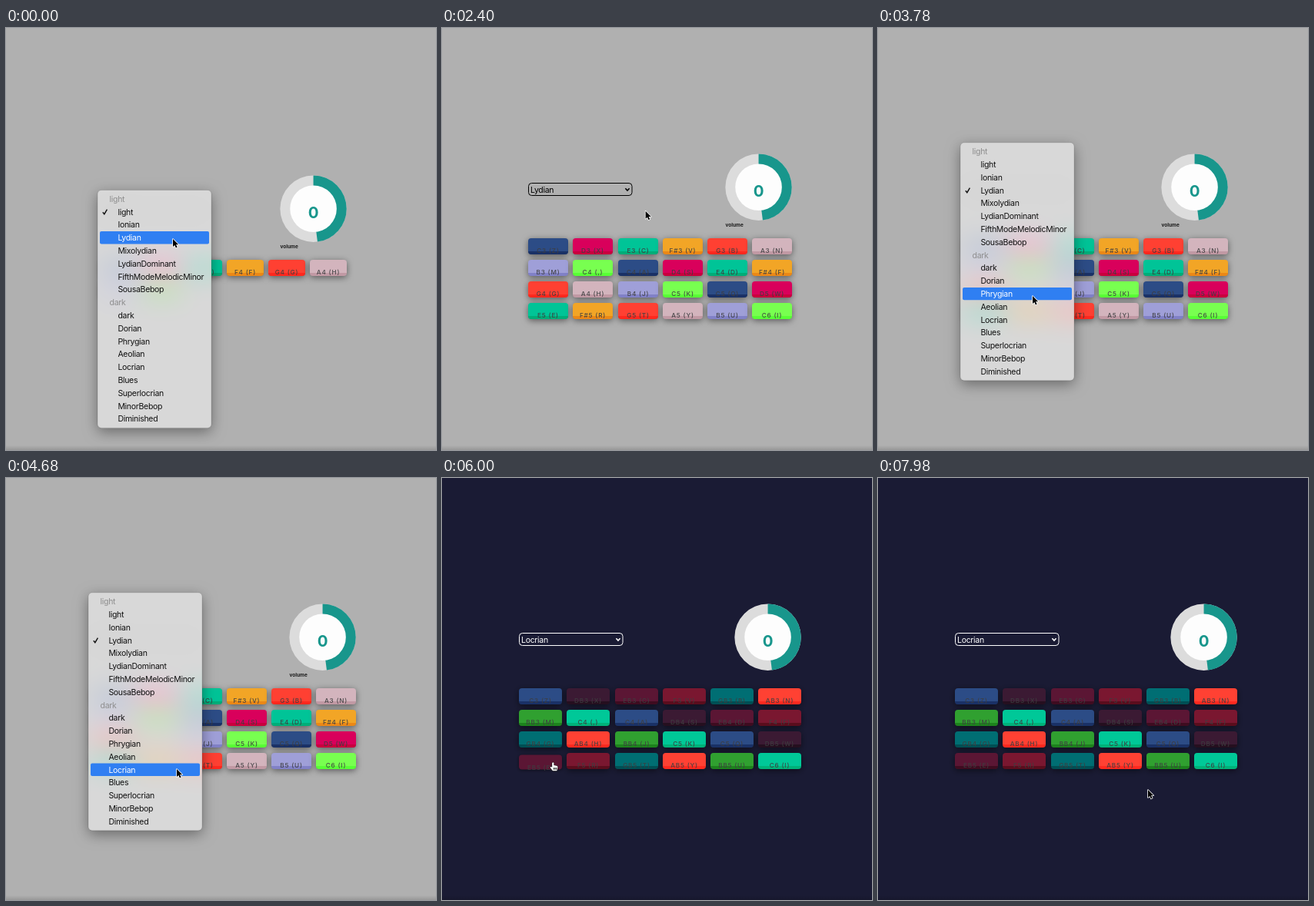
Write an HTML page with a canvas that moves like this. It is 559 px wide and 548 px high and loops after 8 s.

```html
<!DOCTYPE html>
<html lang="en">
<head>
<meta charset="utf-8">
<title>Scale keyboard</title>
<style>
html, body { margin: 0; width: 100%; height: 100%; overflow: hidden; background: #b0b0b0; }
canvas { display: block; }
</style>
</head>
<body>
<canvas id="stage" width="559" height="548"></canvas>
<script>
const W = 559, H = 548, LOOP = 8000, STEP = 60;
const canvas = document.getElementById('stage');
const ctx = canvas.getContext('2d');
const FONT = 'Inter, "Liberation Sans", sans-serif';

const SCALES = {
  light: 'light Ionian Lydian Mixolydian LydianDominant FifthModeMelodicMinor SousaBebop'.split(' '),
  dark: 'dark Dorian Phrygian Aeolian Locrian Blues Superlocrian MinorBebop Diminished'.split(' ')
};
const ITEMS = Object.entries(SCALES).flatMap(([group, names]) =>
  [{ name: group, header: true }, ...names.map(name => ({ name }))]);
const ROW = 16.8, MENU_W = 148, MENU_H = 309;

const LETTERS = 'ZXCVBNM,ASDFGHJKQWERTYUI';
const BRIGHT = ['#2c4c86', '#d9005b', '#00c497', '#f2a526', '#ff4032', '#d3b4bd', '#9f9fd8', '#78ff50'];
const DEEP = ['#2c4c86', '#3b1a33', '#5b1634', '#7a1730', '#006e73', '#ff4133', '#30a030', '#00c898'];

const KEY_H = 21, GAP = 6.1, COLS = 6, CENTER = 283.6;
const LIGHT = layout(48, 301, 'C D E F G A B C', LETTERS.slice(8, 16));
const LYDIAN = layout(52, 273, 'C D E F# G A B C', LETTERS);
const LOCRIAN = layout(56, 273, 'C DB EB F GB AB BB C', LETTERS, true);

// Pointer stops: an eased move to x, y that bows out by bowX, bowY on the way
const STOPS = [
  { t: 0, x: 217, y: 274 },
  { t: 1200, x: 188, y: 314 },
  { t: 2640, x: 222, y: 211, bowX: 215, bowY: 95 },
  { t: 3180, x: 223, y: 316 },
  { t: 3780, x: 201, y: 348, bowY: 100 },
  { t: 4500, x: 222, y: 378, bowY: -170 },
  { t: 4800, x: 222, y: 378 },
  { t: 5100, x: 263, y: 302 },
  { t: 5940, x: 140, y: 365, bowX: 230, bowY: 20 },
  { t: 7020, x: 179, y: 367, bowX: 170, bowY: 172 },
  { t: LOOP - 20, x: 351, y: 405, bowX: 60, bowY: -30 }
];

const ARROW = new Path2D('M0 0V10L2.3 7.9L3.9 11.4L5.6 10.6L4 7.2H7.2Z');
const HAND = new Path2D('M-1.2 6.5V1Q0 -.8 1.1 1V4L5 4.6Q6.2 4.8 6.1 6.5L5 11.2H-.4L-3.8 7Q-3.6 4.8 -1.2 6.5Z');
const KNUCKLES = new Path2D('M1 7v2.6M2.6 7v2.6M4.2 7v2.6');

const clamp = v => Math.max(0, Math.min(1, v));
const lerp = (a, b, k) => a + (b - a) * k;

// The keyboard is centred; the select and dial line up with its edges
function layout(keyW, top, notes, letters, dark = false) {
  const width = COLS * keyW + (COLS - 1) * GAP, left = CENTER - width / 2;
  const names = notes.split(' ');
  const keys = [...letters].map((letter, n) => {
    const i = LETTERS.indexOf(letter), deg = i % 8;
    const octave = 3 + Math.floor(i / 8) + (deg === 7 ? 1 : 0);
    return { deg, label: `${names[deg]}${octave} (${letter})`, w: keyW,
      x: Math.round(left + (n % COLS) * (keyW + GAP)), y: top + Math.floor(n / COLS) * 28 };
  });
  return { keys, dark, x: Math.floor(left), selY: top - 63.5,
    dialX: left + width - 43.3, dialY: top - 66.3 };
}

function pointerAt(t) {
  const i = Math.max(1, STOPS.findIndex(s => s.t >= t));
  const a = STOPS[i - 1], b = STOPS[i];
  const k = (1 - Math.cos(Math.PI * (t - a.t) / (b.t - a.t))) / 2;
  const bow = Math.sin(Math.PI * k);
  return { x: lerp(a.x, b.x, k) + (b.bowX || 0) * bow, y: lerp(a.y, b.y, k) + (b.bowY || 0) * bow };
}

function mix(from, to, k) {
  const channel = (hex, i) => parseInt(hex.slice(i, i + 2), 16);
  return `rgb(${[1, 3, 5].map(i => Math.round(lerp(channel(from, i), channel(to, i), k)))})`;
}

function roundRect(x, y, w, h, r) {
  ctx.beginPath();
  ctx.roundRect(x, y, w, h, r);
}

function stroke(color, width) {
  ctx.strokeStyle = color;
  ctx.lineWidth = width;
  ctx.stroke();
}

function shadow(color, blur, dy) {
  ctx.shadowColor = color;
  ctx.shadowBlur = blur;
  ctx.shadowOffsetY = dy;
}

function text(str, x, y, size, color, { weight = 400, spacing = 0, align = 'left' } = {}) {
  ctx.font = `${weight} ${size}px ${FONT}`;
  ctx.letterSpacing = spacing + 'px';
  ctx.textAlign = align;
  ctx.fillStyle = color;
  ctx.fillText(str, x, y);
}

function uiText(str, x, y, color) {
  text(str, x, y, 10.5, color, { spacing: -0.3 });
}

function drawBackground(dark) {
  ctx.fillStyle = dark ? '#1a1b34' : '#b0b0b0';
  ctx.fillRect(0, 0, W, H);
  const edge = ctx.createLinearGradient(0, H - 6, 0, H);
  edge.addColorStop(0, 'rgba(0,0,0,0)');
  edge.addColorStop(1, 'rgba(0,0,0,.14)');
  ctx.fillStyle = edge;
  ctx.fillRect(0, H - 6, W, 6);
}

function drawKey({ x, y, w, label }, color, hover) {
  const top = y + (hover ? 2.5 : 0), h = KEY_H - (hover ? 2 : 0);
  ctx.save();
  shadow('rgba(0,0,0,.5)', hover ? 4 : 9, hover ? 1 : 2);
  ctx.fillStyle = color;
  roundRect(x, top, w, h, 4);
  ctx.fill();
  ctx.restore();
  if (!hover) {
    ctx.save();
    ctx.clip();
    ctx.globalCompositeOperation = 'multiply';
    ctx.globalAlpha = 0.5;
    ctx.fillStyle = color;
    ctx.fillRect(x, top + h - 4, w, 4);
    ctx.restore();
  }
  text(label, x + w / 2, top + 19, 8.2, 'rgba(62,62,64,.92)',
    { weight: 500, spacing: 0.8, align: 'center' });
}

function drawDial({ dialX: x, dialY: y, dark }) {
  const pie = (r, color, share) => {
    ctx.beginPath();
    ctx.moveTo(x, y);
    ctx.arc(x, y, r, -Math.PI / 2, Math.PI * (2 * share - 0.5));
    ctx.fillStyle = color;
    ctx.fill();
  };
  pie(43.2, '#dcdcdc', 1);
  pie(43.2, '#18968c', 0.48);
  pie(30.3, '#fdfdfd', 1);
  text('0', x, y + 11.8, 20.5, '#18968c', { weight: 700, align: 'center' });
  if (!dark) text('volume', x - 43, y + 50.8, 6.5, '#1c1c1c', { weight: 700 });
}

function drawSelect({ x, selY, dark }, label, focus) {
  const ink = dark ? '#ffffff' : '#000000';
  roundRect(x + 0.5, selY - 8, 134.5, 16, 4);
  stroke(focus ? '#5bb4cc' : ink, 1);
  uiText(label, x + 3, selY + 4.3, ink);
  ctx.beginPath();
  ctx.moveTo(x + 126.4, selY - 1.2);
  ctx.lineTo(x + 129, selY + 1.5);
  ctx.lineTo(x + 131.6, selY - 1.2);
  stroke(ink, 1.6);
}

function drawMenuItem({ name, header }, x, cy, active, checked) {
  const on = active && !header;
  if (on) {
    ctx.fillStyle = '#2f7ff2';
    roundRect(x + 3, cy - 8, MENU_W - 6, 16.4, 2);
    ctx.fill();
  }
  const ink = header ? '#8e8e8e' : on ? '#ffffff' : '#111111';
  uiText(name, x + (header ? 15.5 : 26.4), cy + 4, ink);
  if (checked) {
    ctx.beginPath();
    ctx.moveTo(x + 6.8, cy + 0.8);
    ctx.lineTo(x + 8.8, cy + 3.2);
    ctx.lineTo(x + 12.4, cy - 2.8);
    stroke(ink, 1.4);
  }
}

function drawMenu(lay, choice, pointer, alpha) {
  const checked = ITEMS.findIndex(item => item.name === choice && !item.header);
  const x = lay.x - 5, y = lay.selY - 10.3 - ROW * checked;
  const active = Math.floor((pointer.y - y - 2.9) / ROW);
  const sheet = () => roundRect(x, y, MENU_W, MENU_H, 5);
  ctx.save();
  ctx.globalAlpha = alpha;

  // Blurred backdrop
  ctx.save();
  sheet();
  ctx.clip();
  ctx.filter = 'blur(16px) saturate(1.9)';
  ctx.drawImage(canvas, 0, 0);
  ctx.restore();

  // Shadow outside the sheet only
  ctx.save();
  sheet();
  ctx.rect(0, 0, W, H);
  ctx.clip('evenodd');
  shadow('rgba(0,0,0,.4)', 18, 5);
  ctx.fillStyle = '#999';
  sheet();
  ctx.fill();
  ctx.restore();

  sheet();
  ctx.fillStyle = 'rgba(224,224,224,.84)';
  ctx.fill();
  stroke('rgba(0,0,0,.2)', 0.7);
  ITEMS.forEach((item, i) =>
    drawMenuItem(item, x, y + 11.3 + i * ROW, i === active, i === checked));
  ctx.restore();
}

function drawPointer({ x, y }, hand) {
  ctx.save();
  ctx.translate(x, y);
  ctx.lineJoin = 'round';
  ctx.lineWidth = hand ? 0.9 : 1.6;
  ctx.strokeStyle = hand ? '#000' : '#fff';
  ctx.fillStyle = hand ? '#fff' : '#000';
  const shape = hand ? HAND : ARROW;
  ctx.stroke(shape);
  ctx.fill(shape);
  if (hand) ctx.stroke(KNUCKLES);
  ctx.restore();
}

function stateAt(t) {
  const first = t < 420;
  return {
    lay: first ? LIGHT : t < 5100 ? LYDIAN : LOCRIAN,
    label: first ? 'light' : t < 4920 ? 'Lydian' : 'Locrian',
    menu: t < 2640 ? clamp((420 - t) / 120) : clamp((4980 - t) / 180),
    focus: t >= 5100 && t < 5880,
    fade: clamp((t - 4980) / 160)
  };
}

function draw(t) {
  const { lay, label, menu, focus, fade } = stateAt(t);
  const pointer = pointerAt(t);
  const hovered = menu ? null : lay.keys.find(({ x, y, w }) =>
    pointer.x >= x && pointer.x <= x + w && pointer.y >= y && pointer.y <= y + KEY_H);

  drawBackground(lay.dark);
  drawDial(lay);
  drawSelect(lay, label, focus);
  for (const key of lay.keys) {
    const color = lay.dark ? mix(BRIGHT[key.deg], DEEP[key.deg], fade) : BRIGHT[key.deg];
    drawKey(key, color, key === hovered);
  }
  if (menu) drawMenu(lay, lay === LIGHT ? 'light' : 'Lydian', pointer, menu);
  drawPointer(pointer, Boolean(hovered));
}

const start = performance.now();
function tick() {
  const t = (performance.now() - start) % LOOP;
  draw(Math.floor(t / STEP) * STEP);
  requestAnimationFrame(tick);
}
tick();
</script>
</body>
</html>
```
